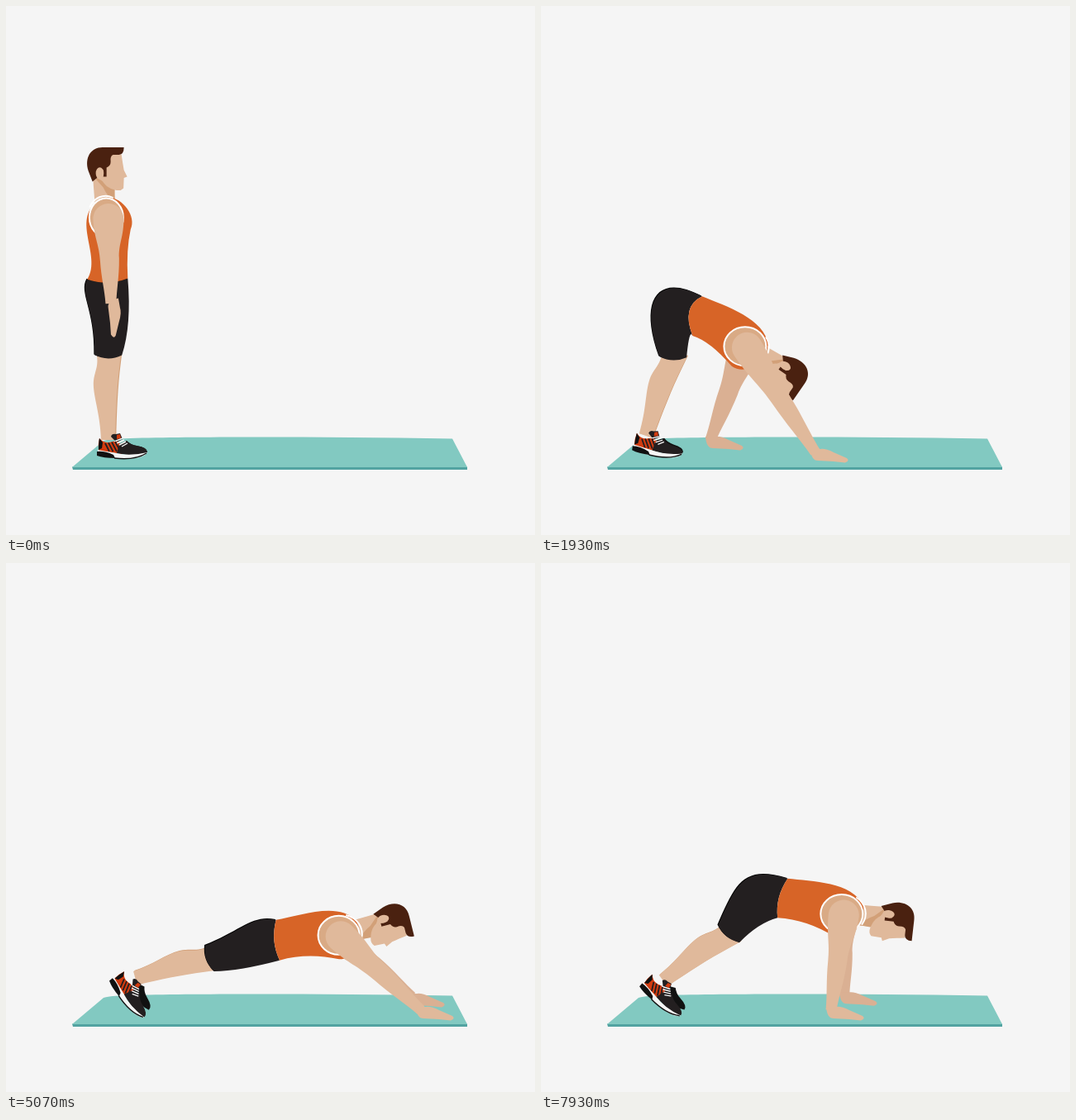
An HTML page with a canvas for the animation above (8000 ms loop, 640 by 640 pixels).

```html
<!DOCTYPE html>
<html lang="en">
<head>
<meta charset="utf-8">
<title>Walk-out exercise</title>
<style>
  html, body { margin: 0; width: 100%; height: 100%; overflow: hidden; background: #f5f5f5; }
  canvas { display: block; }
</style>
</head>
<body>
<canvas id="stage" width="640" height="640"></canvas>
<script>
const ctx = document.getElementById('stage').getContext('2d');
const LOOP = 8000, DEG = Math.PI / 180;
const SKIN = '#e0b99b', FAR_SKIN = '#dab093', SHADE = '#d9aa85', LINE = '#d2a078';
const ORANGE = '#d76427', SHORTS = '#231f20', HAIR = '#4a2110', RED = '#d23c10';

// Key poses: time, hip x, hip y, torso lean, head lift, heel lift (degrees)
const bodyKeys = [
  [0, 124, 356, -1.5, -1.5, 0],
  [430, 117, 356, 90, -2, 0],
  [900, 120, 361, 128, -7, 0],
  [1140, 120.5, 361, 128.7, -7, 0],
  [1790, 148, 358, 123, -5, 4],
  [2570, 255.5, 376, 117, 17, 38],
  [3570, 297, 447, 86, 13, 46],
  [5070, 303, 459, 85, 9, 50],
  [5800, 303, 459, 85, 9, 50],
  [7930, 267, 399.5, 104.5, 8, 39]
];

// Wrists drop to the mat (time, x, y, hang), then step along it (start, end, x)
const nearArm = {
  drop: [[0, 127, 360, 1], [430, 212, 462, .9], [860, 197, 541, 0]],
  steps: [[1400, 2050, 345], [2850, 3550, 455], [4330, 5000, 502], [6070, 6600, 420], [7050, 7650, 351]]
};
const farArm = {
  drop: [[0, 126, 356, 1], [430, 217, 455, .9], [860, 205, 525, 0]],
  steps: [[2200, 2915, 410], [3580, 4250, 491], [6450, 7050, 425], [7550, 8100, 350]]
};

const clamp = v => Math.min(1, Math.max(0, v));
const mix = (a, b, k) => a + (b - a) * k;
const smooth = p => p * p * (3 - 2 * p);

// Monotone cubic interpolation through rows of [time, ...values]
function sample(keys, time) {
  const last = keys.length - 1;
  if (time >= keys[last][0]) return keys[last].slice(1);
  const i = keys.findIndex((key, n) => time < keys[n + 1][0]);
  const span = keys[i + 1][0] - keys[i][0], p = (time - keys[i][0]) / span;
  const slope = (n, c) => (keys[n + 1][c] - keys[n][c]) / (keys[n + 1][0] - keys[n][0]);
  const tangent = (n, c) => {
    if (n === 0) return 0;
    if (n === last) return slope(n - 1, c);
    const a = slope(n - 1, c), b = slope(n, c);
    return a * b > 0 ? 2 * a * b / (a + b) : 0;
  };
  return keys[i].slice(1).map((from, n) => mix(from, keys[i + 1][n + 1], smooth(p)) +
    span * p * (1 - p) * ((1 - p) * tangent(i, n + 1) - p * tangent(i + 1, n + 1)));
}

function wristAt({ drop, steps }, time) {
  let [x, y, hang] = sample(drop, time);
  for (const [start, end, to] of steps) {
    const p = clamp((time - start) / (end - start));
    x = mix(x, to, smooth(p));
    y -= 2 * Math.sin(Math.PI * p);
  }
  return { x, y, hang };
}

// Body frame: maps (distance up the bone, distance toward the back) to the stage
const frame = ([x, y], angle) => (up, back) => [
  x + up * Math.sin(angle) - back * Math.cos(angle),
  y - up * Math.cos(angle) - back * Math.sin(angle)
];
// Lean from the vertical of the line that rises from one joint to another
const lean = (low, high) => Math.atan2(high[0] - low[0], low[1] - high[1]);

function fill(color, path) {
  ctx.fillStyle = color;
  ctx.fill(new Path2D(path));
}
function stroke(color, width, path) {
  ctx.strokeStyle = color;
  ctx.lineWidth = width;
  ctx.stroke(new Path2D(path));
}
function placed([x, y], angle, draw) {
  ctx.save();
  ctx.translate(x, y);
  ctx.rotate(angle);
  draw();
  ctx.restore();
}
// Draws with the local y axis running from one joint to the next
function limb(from, to, draw) {
  const length = Math.hypot(to[0] - from[0], to[1] - from[1]);
  placed(from, lean(to, from), () => draw(length));
}

function drawMat() {
  fill('#52a3a1', 'M80,557.5H558V561H81Z');
  fill('#82c9c1', 'M80,558L118,526Q124,523.5 150,523C230,521 380,521 540,523.5L558,558Z');
}

function drawArm(shoulder, wrist, color) {
  limb(shoulder, [wrist.x, wrist.y], len => fill(color,
    `M-18.5,0A18.5,18.5 0 0 1 18.5,0C18,${len * .22} 11,${len * .3} 11.5,${len * .47}
     C11,${len * .7} 7,${len * .85} 6.5,${len}H-6.5C-7,${len * .85} -11,${len * .68} -11.5,${len * .5}
     C-12,${len * .3} -18,${len * .22} -18.5,0Z`));
  placed([wrist.x + 6 * wrist.hang, wrist.y], 80 * DEG * wrist.hang, () =>
    fill(color, 'M-6,-4Q-5,10 3,10L22,11L36,12.5Q42,10 38,7L22,0Q12,-5 6,-4Z'));
}

function drawLeg([x, y], [ankleX, ankleY]) {
  const shape = len => `M-15,-6C-10,14 -17,18 -18,34C-18,52 -10,70 -9,${len + 3}
    H8C9,${len * .7} 10,40 14,10L16,-6Z`;
  limb([x + 1.2, y - 1], [ankleX + 1.2, ankleY - 1], len => fill(LINE, shape(len)));
  limb([x, y], [ankleX, ankleY], len => fill(SKIN, shape(len)));
}

const TOE_CAP = 'M134,541L137,530L146,526Q151,531 158,532Q171,534 171,540Q160,545 148,543Z';

function drawShoe([x, y], angle) {
  const raised = angle / (45 * DEG);
  placed([x + 5 * raised, y - 8 * raised], angle, () => {
    ctx.translate(-157, -546);
    fill('#111', TOE_CAP);
  });
  placed([x, y], angle, () => {
    ctx.translate(-157, -546);
    fill(SHORTS, 'M127,521Q128,517 133,518L138,517L141,524L134,528Z');
    fill(RED, 'M134,519L138,518L139,523L134,524Z');
    fill(RED, 'M113,523Q118,529 125,528L133,526L142,532V542L112,538Q111,530 113,523Z');
    fill('#111', 'M113,523L117,528L116,535L112,537Q112,528 113,523Z');
    fill(SHORTS, TOE_CAP);
    for (let i = 0; i < 4; i++) {
      stroke(SHORTS, 1.8, `M${120 + 4 * i},${529 - i * .7}L${125 + 4.5 * i},539`);
      stroke('#f5f5f5', 1.4, `M${131 + 3 * i},${527 + 2 * i}L${141 + 2 * i},${523 + 2 * i}`);
    }
    fill('#f5f5f5', 'M111,537L133,541Q150,545 171,540Q168,546 152,547.5Q126,549 111,542Z');
    fill('#111', 'M110,539Q119,538 130,543L132,547Q118,547 110,544Z');
    stroke('#111', 1.4, 'M131,547Q156,550 170,541');
  });
}

// The origin of the head is the nape
function drawHead(nape, angle) {
  placed(nape, angle, () => {
    ctx.translate(-107, -210);
    fill(LINE, 'M108,203L133,219L132,233Q124,228 119,217L111,208Z');
    fill(SKIN, `M121,177H141C142,184 143,190 144,196L148,204L144,205.5L143.5,218
      Q140,222 133,220Q121,217 117,207L109,204Z`);
    fill(HAIR, `M106,210L101,197C96,181 104,168 119,168.5H144Q144,177 138,177.5H131
      Q127,179 128,186Q128,191 123,193V204H119V195L112,205Z`);
    fill(SKIN, 'M110,200a4.8,7.2 0 1 0 9.6,0a4.8,7.2 0 1 0 -9.6,0Z');
  });
}

function draw(time) {
  const [hipX, hipY, torsoLean, headLift, heelLift] = sample(bodyKeys, time);
  const hip = [hipX, hipY], torso = torsoLean * DEG, foot = heelLift * DEG;
  const head = torso - headLift * DEG;

  // Legs: planted toe, raised heel, slightly bent knee
  const toe = [157 - heelLift / 15, 546 - heelLift / 15];
  const [ankleX, ankleY] = frame(toe, foot)(24, 33);
  const ankle = [ankleX + heelLift * .17, ankleY];
  const leg = lean(ankle, hip);
  const flex = torso - leg, bent = Math.sin(flex), folded = Math.max(0, flex - 1.34);
  const knee = frame(hip, leg)(-.4 * Math.hypot(hipX - ankle[0], hipY - ankle[1]), -12 * bent);

  // Torso: the waist line tilts in a deep fold, the lower back arches when upright
  const fromHip = frame(hip, torso);
  const thigh = lean(knee, hip), fromThigh = frame(hip, thigh), fromKnee = frame(knee, thigh);
  const shoulder = fromHip(100, 0), at = frame(shoulder, torso);
  const arch = clamp(Math.cos(torso));
  const waist = fromHip(26 + 10 * folded, 0);
  const acrossWaist = frame(waist, torso - .55 * folded);
  const backWaist = acrossWaist(0, 25), frontWaist = acrossWaist(0, -24);
  const waistLine = `Q${frame(waist, torso)(-9 - 24 * folded, 0)},${backWaist}Z`;
  const nape = at(44, 15.5 + .6 * headLift);

  const shorts = `M${backWaist}
    C${fromHip(8 - 46 * bent, 35 - 8 * flex)},${fromThigh(25 * folded - 12, 16 + 14.5 * flex)},${fromKnee(0, 16.5)}
    Q${fromKnee(-8, 0)},${fromKnee(0, -16.5)}
    Q${fromThigh(-30, 10 * bent - 28)},${frontWaist}${waistLine}`;
  const shirt = `M${backWaist}
    C${at(-45, 29 - 24 * arch)},${at(3, 41 + 6 * arch)},${at(23, 16 - 12 * arch)}
    C${at(30, -4 - 12 * arch)},${at(20 - 18 * arch, -30 - 8 * arch)},${at(-1 - 14 * arch, -29)}
    Q${at(-39, -17 - 6 * arch)},${frontWaist}${waistLine}`;

  fill('#f5f5f5', 'M0,0H640V640H0Z');
  drawMat();
  drawArm([shoulder[0], shoulder[1] + 2], wristAt(farArm, time), FAR_SKIN);
  drawLeg(knee, ankle);
  drawShoe(toe, foot);
  stroke(SKIN, 25, `M${shoulder}L${frame(nape, head)(5, -12)}`);
  drawHead(nape, head);
  placed([-.8, -.8], 0, () => fill('#000', shorts));
  fill(SHORTS, shorts);
  fill(ORANGE, shirt);

  // Collar and armhole trim
  const radius = 26 - 5 * arch, toHead = lean(shoulder, nape) - Math.PI / 2;
  const [collarX, collarY] = frame(shoulder, lean(shoulder, nape))(3, 0);
  ctx.strokeStyle = '#fff';
  ctx.lineWidth = 2;
  ctx.beginPath();
  ctx.ellipse(collarX, collarY, radius, 23.5, 0, toHead - .8, toHead + .8);
  ctx.stroke();
  ctx.beginPath();
  ctx.ellipse(...shoulder, radius - .5, 23.5, 0, 0, 2 * Math.PI);
  ctx.fillStyle = SHADE;
  ctx.fill();
  ctx.stroke();
  drawArm([shoulder[0] + 2.5, shoulder[1] + 1.5], wristAt(nearArm, time), SKIN);
}

function tick() {
  draw(performance.now() % LOOP);
  requestAnimationFrame(tick);
}
tick();
</script>
</body>
</html>
```
